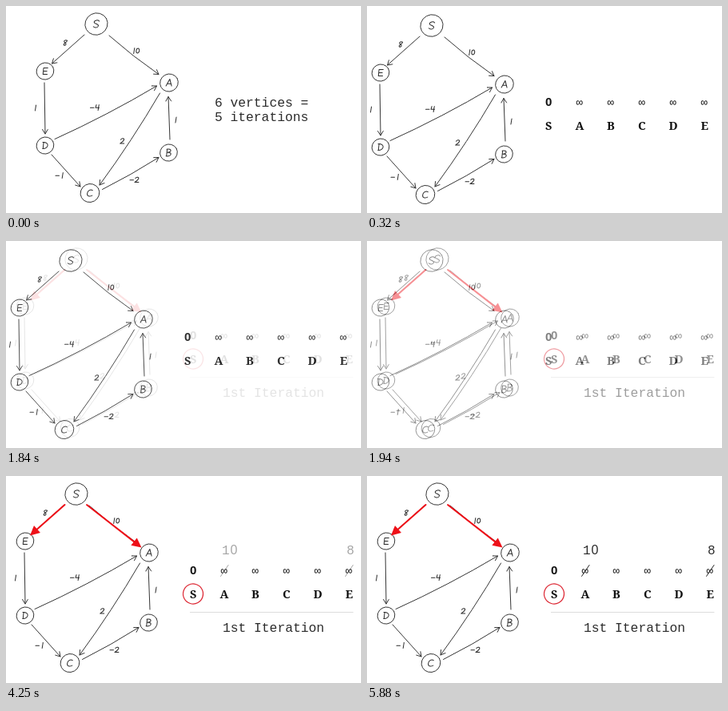
These frames come from a looping animation (444x259 px, 8000 ms). An HTML page with a canvas:

```html
<!DOCTYPE html>
<html lang="en">
<head>
<meta charset="utf-8">
<title>Shortest paths, first iteration</title>
<style>
html, body { margin: 0; width: 100%; height: 100%; overflow: hidden; background: #fff; }
canvas { display: block; width: 100vw; height: 100vh; }
</style>
</head>
<body>
<canvas id="stage"></canvas>
<script>
const W = 444, H = 259, LOOP = 8000;
const INK = '#2b2b2b', RED = '#ee1018';
const MONO = '"Liberation Mono", monospace';
const ratio = window.devicePixelRatio || 1;

// Handwritten strokes, each centred on 0,0
const GLYPHS = {
  S: 'M3.4-3.6C1.5-6-3.5-4.6-3-2C-2.5 0 3.2-.2 2.8 2.6C2.3 5.4-2 5.2-3.5 3.4',
  E: 'M3-4H-2.4V4H3M-2.4 0H2.2',
  A: 'M-3.6 4.2L.4-4.6L3.6 4.2M-2.2 1.2H2.8',
  B: 'M-2.4-4.6V4.6M-3-4.5C4-5.6 4-.5-2-.3C5-.8 4.6 5-3 4.5',
  C: 'M3-3.4C0-5.4-3.4-3-3.4.5C-3.4 4.4 0 5 3.2 3.2',
  D: 'M-2.4-4V4M-3.5-4C5.8-4.6 5 4.6-3 4',
  0: 'M0-3.2C-3-3-2.6 3.2 0 3.2C3 3 2.8-3.4 0-3.2',
  1: 'M.2-3.8L-.2 3.8',
  2: 'M-2.4-2C-1.4-4.6 3-4 2-1.4C1.2.8-1 2.2-2.8 3.4H2.8',
  4: 'M-1.8-3.8L-2.4.4H2.6M1.8-3.8L1.4 4',
  8: 'M2.5-3C-.6-4.6-3.4-2-.2-.2C3 1.6.8 4.2-1.2 3.4C-3.6 1.4 1.8.2 2.5-3',
  '-': 'M-2.5.2H2.5'
};
for (const key in GLYPHS) GLYPHS[key] = new Path2D(GLYPHS[key]);

const NODES = [
  ['S', 113, 22.5, 14.3], ['E', 49, 81.5, 11], ['A', 204, 96, 11.5],
  ['D', 49, 174.5, 11], ['B', 203.5, 183.5, 11], ['C', 105, 234, 12]
];
// Start, end, sideways bow, then the weight and its place
const EDGES = [
  [98, 36, 57.5, 72, 0, '8', 74, 46],
  [129, 37, 191, 85.5, 1.2, '10', 162.5, 56],
  [48, 96, 49, 160, 0, '1', 37, 127.5],
  [61, 166.5, 188.5, 100, 2, '-4', 111, 127],
  [192.5, 109, 117, 224, -1.8, '2', 145.5, 169],
  [57, 186, 93, 226, 0, '-1', 67.5, 212],
  [120.5, 229.5, 191, 189.5, 1, '-2', 160.5, 217.5],
  [205, 167, 203, 113.5, 0, '1', 212.5, 142.5]
];
const COLUMNS = ['S', 'A', 'B', 'C', 'D', 'E'];
const columnX = i => 234 + 39 * i;

function makeLayer(canvas) {
  canvas.width = W * ratio;
  canvas.height = H * ratio;
  const g = canvas.getContext('2d');
  g.scale(ratio, ratio);
  g.lineCap = g.lineJoin = 'round';
  return g;
}
const stage = makeLayer(document.getElementById('stage'));
const overlay = makeLayer(document.createElement('canvas'));

function line(g, color, width, ...pts) {
  g.strokeStyle = color;
  g.lineWidth = width;
  g.beginPath();
  for (let i = 0; i < pts.length; i += 2) g.lineTo(pts[i], pts[i + 1]);
  g.stroke();
}

function ring(g, x, y, rx, ry, color, width) {
  g.strokeStyle = color;
  g.lineWidth = width;
  g.beginPath();
  g.ellipse(x, y, rx, ry, -0.5, 0, 7);
  g.stroke();
}

function glyph(g, key, x, y, size) {
  g.save();
  g.transform(size, 0, -0.1, size, x, y);
  g.strokeStyle = INK;
  g.lineWidth = 1 / size;
  g.stroke(GLYPHS[key]);
  g.restore();
}

function text(g, str, x, y, font, color = '#2c2c2c') {
  g.font = font;
  g.fillStyle = color;
  g.textAlign = 'left';
  g.fillText(str, x, y);
}

// Centres the visible ink on x,y
function centred(g, str, x, y, font) {
  g.font = font;
  g.textAlign = 'left';
  g.fillStyle = '#111';
  const m = g.measureText(str);
  g.fillText(str,
    x + (m.actualBoundingBoxLeft - m.actualBoundingBoxRight) / 2,
    y + (m.actualBoundingBoxAscent - m.actualBoundingBoxDescent) / 2);
}

function drawEdge(g, x1, y1, x2, y2, bow) {
  const a = Math.atan2(y2 - y1, x2 - x1);
  const cx = (x1 + x2) / 2 - 2 * bow * Math.sin(a);
  const cy = (y1 + y2) / 2 + 2 * bow * Math.cos(a);
  const tip = Math.atan2(y2 - cy, x2 - cx);
  const barb = s => [x2 - 6.5 * Math.cos(tip + s), y2 - 6.5 * Math.sin(tip + s)];
  g.strokeStyle = INK;
  g.lineWidth = 0.95;
  g.beginPath();
  g.moveTo(x1, y1);
  g.quadraticCurveTo(cx, cy, x2, y2);
  g.stroke();
  line(g, INK, 0.95, ...barb(0.55), x2, y2, ...barb(-0.55));
}

function drawGraph(g) {
  for (const [x1, y1, x2, y2, bow, weight, wx, wy] of EDGES) {
    drawEdge(g, x1, y1, x2, y2, bow);
    const step = weight[0] === '-' ? 6.5 : 4.5;
    [...weight].forEach((c, i) =>
      glyph(g, c, wx + (i - (weight.length - 1) / 2) * step, wy, 0.9));
  }
  for (const [name, x, y, r] of NODES) {
    ring(g, x, y, r, r * 0.95, INK, 0.95);
    glyph(g, name, x, y, 0.97);
  }
}

function redArrow(g, x1, y1, x2, y2) {
  const a = Math.atan2(y2 - y1, x2 - x1), len = 12, half = 6;
  const bx = x2 - len * Math.cos(a), by = y2 - len * Math.sin(a);
  const dx = half * Math.sin(a), dy = -half * Math.cos(a);
  line(g, RED, 2, x1, y1, bx, by);
  g.fillStyle = RED;
  g.beginPath();
  g.moveTo(x2, y2);
  g.lineTo(bx + dx, by + dy);
  g.lineTo(bx - dx, by - dy);
  g.fill();
}

function drawTable(g) {
  COLUMNS.forEach((name, i) => {
    const x = columnX(i);
    if (i) centred(g, '∞', x, 118.5, `14px ${MONO}`);
    else centred(g, '0', x, 118, 'bold 15px "Liberation Sans", sans-serif');
    centred(g, name, x, 147.5, 'bold 14.5px "Noto Serif", serif');
  });
}

function drawUpdates(g, alpha) {
  g.globalAlpha = alpha;
  for (const x of [273, 429]) line(g, '#222', 1, x - 4.5, 125.5, x + 5, 111.5);
  text(g, '1', 270, 98, `16px ${MONO}`);
  text(g, '0', 280.5, 98, '16px "Liberation Sans", sans-serif');
  text(g, '8', 426, 98, `16px ${MONO}`);
  g.globalAlpha = 1;
}

function shifted(g, dx, dy, draw) {
  g.save();
  g.translate(dx, dy);
  draw(g);
  g.restore();
}

function drawIntro(g) {
  drawGraph(g);
  text(g, '6 vertices =', 261, 125.5, `16.3px ${MONO}`);
  text(g, '5 iterations', 261, 144, `16.3px ${MONO}`);
}

function drawStart(g) {
  shifted(g, -32, 2, drawGraph);
  shifted(g, -7, 2, drawTable);
}

function drawIteration(g, updates) {
  shifted(g, -25, 0, drawGraph);
  drawTable(g);
  redArrow(g, 73.5, 36, 30, 74.5);
  redArrow(g, 101, 36, 169.5, 89.5);
  ring(g, 234, 147.5, 12.5, 12.5, '#dc2430', 1.2);
  line(g, '#dcdcdc', 1, 230, 170.5, 434, 170.5);
  text(g, '1st Iteration', 271, 195, `16.3px ${MONO}`);
  if (updates) drawUpdates(g, updates);
}

// Value of the last [time, value] pair reached
function stepped(t, steps) {
  let value = 0;
  for (const [at, v] of steps) if (t >= at) value = v;
  return value;
}

function paint(g, scene, arg) {
  g.fillStyle = '#fff';
  g.fillRect(0, 0, W, H);
  scene(g, arg);
}

function blend(from, to, mix, arg) {
  if (mix >= 1) return paint(stage, to, arg);
  paint(stage, from);
  if (!mix) return;
  paint(overlay, to, arg);
  stage.globalAlpha = mix;
  stage.drawImage(overlay.canvas, 0, 0, W, H);
  stage.globalAlpha = 1;
}

function render(t) {
  if (t < 1840) {
    blend(drawIntro, drawStart,
      stepped(t, [[170, 0.2], [220, 0.48], [270, 0.76], [320, 1]]));
  } else {
    blend(drawStart, drawIteration,
      stepped(t, [[1840, 0.12], [1940, 0.46], [1960, 0.6], [2020, 1]]),
      stepped(t, [[4250, 0.42], [4730, 0.97], [5880, 1]]));
  }
}

const begin = performance.now();
function tick() {
  render((performance.now() - begin) % LOOP);
  requestAnimationFrame(tick);
}
tick();
</script>
</body>
</html>
```
